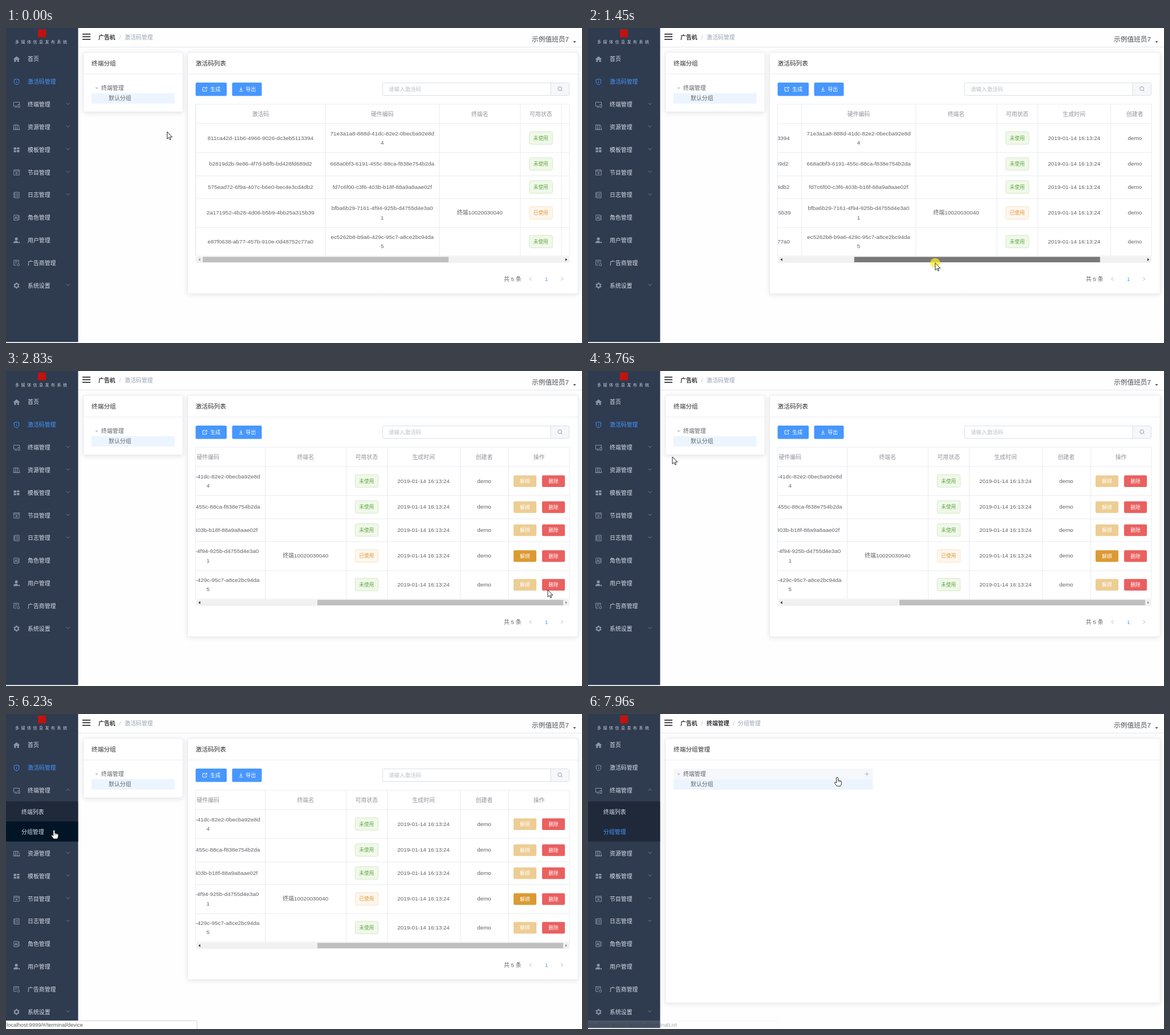
Recreate the animation shown at these times as an HTML page with a canvas. Size 1010 by 554 pixels, loop 8 s.

```html
<!DOCTYPE html>
<html lang="zh">
<head>
<meta charset="utf-8">
<title>激活码管理</title>
<style>
html, body { margin: 0; width: 100%; height: 100%; overflow: hidden; background: #fefefe; }
canvas { display: block; width: 1010px; height: 554px; }
</style>
</head>
<body>
<canvas id="stage" width="1010" height="554"></canvas>
<script>
const g = document.getElementById('stage').getContext('2d');
const LOOP = 8000;
const FONT = '"Liberation Sans", "Noto Sans CJK SC", "Noto Sans CJK", sans-serif';
const BLUE = '#4797ff', INK = '#303133', BODY = '#606266', LINE = '#e8ebf1';
const SIDE = '#2f3b4f', SUB = '#1f2939';
const SIDE_W = 126.5, SUB_Y = 153.5, SUB_H = 35.5;

const clamp = v => Math.max(0, Math.min(1, v));
const span = (t, a, b) => clamp((t - a) / (b - a));
const smooth = p => p * p * (3 - 2 * p);
const easeOut = p => 1 - Math.pow(1 - p, 2.4);
const within = (v, a, b) => v >= a && v < b;

// ---- drawing helpers ----
function rect(x, y, w, h, color) {
  g.fillStyle = color;
  g.fillRect(x, y, w, h);
}
function box(x, y, w, h, r, fill, edge) {
  g.beginPath();
  g.roundRect(x, y, w, h, r);
  g.fillStyle = fill;
  g.fill();
  if (edge) {
    g.strokeStyle = edge;
    g.lineWidth = 1;
    g.stroke();
  }
}
function text(s, x, y, color, { size = 9.9, align = 'left', weight = '' } = {}) {
  g.font = `${weight} ${size}px ${FONT}`;
  g.textAlign = align;
  g.textBaseline = 'alphabetic';
  g.fillStyle = color;
  g.fillText(s, x, y + size * 0.37);
}
function path(d, x, y, { fill, stroke, width = 1, turn = 0 }) {
  g.save();
  g.translate(x, y);
  g.rotate(turn);
  const p = new Path2D(d);
  if (fill) { g.fillStyle = fill; g.fill(p); }
  if (stroke) { g.strokeStyle = stroke; g.lineWidth = width; g.stroke(p); }
  g.restore();
}
function faded(alpha, dx, draw) {
  if (alpha <= 0) return;
  g.save();
  g.globalAlpha *= alpha;
  g.translate(dx, 0);
  draw();
  g.restore();
}

// ---- pointer ----
const track = [
  [0, 282.6, 182.6], [70, 282.6, 182.6], [530, 949, 440], [680, 949, 440],
  [1000, 487, 407], [1220, 487, 407], [1640, 699, 418], [1830, 701, 419],
  [2060, 701, 419], [2500, 890, 318], [2830, 950, 385], [2920, 950, 385],
  [3300, 760, 408], [3460, 760, 408], [3580, 500, 405], [3760, 148, 151],
  [4080, 97, 137], [4480, 97, 137], [4800, 97, 182], [5970, 97, 182],
  [6230, 84.3, 204], [7680, 84.3, 204], [7950, 437, 111], [8000, 437, 111]
];
function pointer(t) {
  const i = track.findIndex(k => k[0] > t);
  const a = track[i - 1], b = track[i];
  const p = smooth(span(t, a[0], b[0]));
  return { x: a[1] + (b[1] - a[1]) * p, y: a[2] + (b[2] - a[2]) * p };
}
const presses = [[1080, 1830], [4300, 4450], [6690, 6860]];
const ARROW = 'M0 0V12.4L2.8 9.8L4.8 14L6.6 13.2L4.8 9.1H8.8Z';
const HAND = 'M-1.5 1.2Q0-1 1.5 1.2V5.5L5.8 6.6Q7.8 7.2 7.6 9.5L7 13L5.6 15.8H-.6L-4.6 10.6Q-4.6 8.6-3 8.9L-1.5 10.2Z';

function drawPointer(t, c) {
  if (presses.some(([a, b]) => within(t, a, b))) {
    faded(0.72, 0, () => {
      g.beginPath();
      g.arc(c.x, c.y, 8.6, 0, 7);
      g.fillStyle = '#fff01e';
      g.fill();
    });
  }
  const onTree = t > 7600 && c.x < 500 && c.x > 150 && c.y < 133;
  const hand = c.x < 127 || onTree;
  path(hand ? HAND : ARROW, c.x, c.y, { fill: '#fff', stroke: '#111', width: 0.9 });
  if (hand) path('M1.5 5.5V9M3.6 6V9M5.7 6.6V9', c.x, c.y, { stroke: '#333', width: 0.6 });
}

// ---- sidebar ----
const menu = [
  ['首页', 'M-6 0L0-5L6 0H4.2V5H1.2V1.4H-1.2V5H-4.2V0Z', 1],
  ['激活码管理', 'M0-5L4.3-3.6V0Q4.3 3.8 0 5.2Q-4.3 3.8-4.3 0V-3.6ZM0-2.2V-1M0 0V2.4'],
  ['终端管理', 'M1 3H-5V-4H5V-1M-3 5H1M2.5 0H5.5V5H2.5Z', 0, 1],
  ['资源管理', 'M-5-4H-2V4H-5ZM-2-4H1V4H-2ZM1-3.4L3.2-4L5.2 4H1.5M-6 4.5H6', 0, 1],
  ['模板管理', 'M-5-4H-.6V0H-5ZM.6-4H5V-1H.6ZM-5 1.2H-.6V4.4H-5ZM.6 .2H5V4.4H.6Z', 1, 1],
  ['节目管理', 'M-4.8-4.5H4.8V4.8H-4.8ZM-4.8-2.2H4.8M-1 0L1.8 1.4L-1 2.8Z', 0, 1],
  ['日志管理', 'M-3-4.8H4.6V5H-3ZM-4.8-5V5M-1-2.3H3M-1 0H3M-1 2.4H3', 0, 1],
  ['角色管理', 'M-4.6-4.6H2.6V4.6H-4.6ZM4.6-4.5V4.5M-3 2.8L-1-2.6L1 2.8M-2.4 1H.4'],
  ['用户管理', 'M-3-2.6A2.6 2.6 0 1 1 2.2-2.6A2.6 2.6 0 1 1-3-2.6M-5.6 5Q-5 .6-.4 .8Q2 .8 2.4 2V5ZM3.2 2.6H5.6V5H3.2Z', 1],
  ['广告商管理', 'M-.5 3.8H-4.8V-4.8H3.6V-.4M-3-2.4H2M-3 0H0M1.2 3A2 2 0 1 1 5.2 3A2 2 0 1 1 1.2 3'],
  ['系统设置', 'M3.2 0A3.2 3.2 0 1 1-3.2 0A3.2 3.2 0 1 1 3.2 0M0-5.4V-3M0 3V5.4M4.7-2.7L2.6-1.5M-4.7 2.7L-2.6 1.5M4.7 2.7L2.6 1.5M-4.7-2.7L-2.6-1.5', 0, 1]
];

function drawSidebar(t, c) {
  const open = easeOut(span(t, 4300, 4620));
  const moved = t >= 6860;
  rect(0, 0, SIDE_W, 552.3, SIDE);
  rect(56, 2.5, 14, 14, '#c0130f');
  g.letterSpacing = '3.5px';
  text('多媒体信息发布系统', 16, 24, '#c9cfd8', { size: 7 });
  g.letterSpacing = '0px';

  menu.forEach(([label, icon, solid, arrow], i) => {
    const y = 54.8 + i * 39.82 + (i > 2 ? open * 2 * SUB_H : 0);
    const over = c.x < SIDE_W && Math.abs(c.y - y) < 19.9;
    if (over && (i < 3 || open === 0)) rect(0, y - 19.9, SIDE_W, 39.8, '#283446');
    const active = i === 1 && !moved;
    const tone = active ? BLUE : '#8b95a4';
    const thick = i === 10 ? 2 : 1;
    path(icon, 18.5, y, solid ? { fill: tone } : { stroke: tone, width: thick });
    text(label, 38, y, active ? BLUE : '#d8dfe9');
    if (arrow) path('M-3-1.5L0 1.5L3-1.5', 108.5, y - 1.2, { stroke: '#7d8898', width: 0.9, turn: i === 2 ? open * Math.PI : 0 });
  });

  if (!open) return;
  g.save();
  g.beginPath();
  g.rect(0, SUB_Y, SIDE_W, 2 * SUB_H * open);
  g.clip();
  rect(0, SUB_Y, SIDE_W, 2 * SUB_H, SUB);
  ['终端列表', '分组管理'].forEach((label, i) => {
    const top = SUB_Y + i * SUB_H;
    const over = t > 4620 && c.x < SIDE_W && within(c.y, top, top + SUB_H);
    if (over) rect(0, top, SIDE_W, SUB_H, i ? '#021526' : '#111d2b');
    text(label, 27, top + 18.7, i && moved ? BLUE : '#d8dfe9');
  });
  g.restore();
}

// ---- header ----
function drawHeader(t) {
  rect(SIDE_W, 33, 884, 1, '#e4e6ea');
  for (let i = 0; i < 3; i++) rect(134, 10 + i * 4.6, 14, 1.5, '#111');
  text('广告机', 162, 16.5, INK, { weight: 'bold' });
  text('/', 198.5, 16.5, '#b4bac5');
  const p = easeOut(span(t, 6860, 7360));
  faded(1 - p, p * 20, () => text('激活码管理', 208, 16.5, '#97a3b4'));
  faded(p, (1 - p) * 20, () => {
    text('终端管理', 208, 16.5, INK, { weight: 'bold' });
    text('/', 254, 16.5, '#b4bac5');
    text('分组管理', 263, 16.5, '#97a3b4');
  });
  text('示例值班员7', 922, 20, '#4a4d52', { size: 11.7 });
  path('M-2.7-1.3H2.7L0 1.6Z', 997, 24.5, { fill: '#444' });
  if (t >= 6860) drawProgress(t);
}

function drawProgress(t) {
  faded(1 - span(t, 6960, 7100), 0, () => {
    rect(0, 0, 1010 * easeOut(span(t, 6840, 7000)), 1.5, '#2299dd');
  });
  faded(1 - span(t, 7000, 7180), 0, () => {
    const a = (t - 7090) / 64;
    g.beginPath();
    g.arc(995, 18, 6, a, a + 2.9);
    g.strokeStyle = '#2299dd';
    g.lineWidth = 1.5;
    g.stroke();
  });
}

// ---- pages ----
function card(x, y, w, h, title) {
  g.save();
  g.shadowColor = 'rgba(0,0,0,.11)';
  g.shadowBlur = 8;
  g.shadowOffsetY = 1.5;
  box(x, y, w, h, 2.5, '#fff');
  g.restore();
  box(x + 0.5, y + 0.5, w - 1, h - 1, 2.5, '#fff', LINE);
  rect(x, y + 38, w, 1, LINE);
  text(title, x + 14.5, y + 19.7, INK, { size: 10.7 });
}
function tree(width, hover) {
  if (hover) {
    rect(150, 96, width, 18.5, '#f5f7fa');
    path('M-3.5 0H3.5M0-3.5V3.5', 489, 105.5, { stroke: '#93aede', width: 0.9 });
  }
  rect(150, 114.5, width, 18.5, '#ecf5ff');
  path('M-2.8-1.5H2.8L0 1.7Z', 159, 106, { fill: '#c0c4cc' });
  text('终端管理', 167, 105.3, BODY);
  text('默认分组', 180, 123.8, BODY);
}

const cols = [332.5, 560, 759.5, 902, 973.5, 1101.5, 1186.5, 1293.5];
const heads = ['激活码', '硬件编码', '终端名', '可用状态', '生成时间', '创建者', '操作'];
const rows = [
  [168, 219, '811ca42d-11b6-4966-9026-dc3eb5113394', '71e3a1a8-888d-41dc-82e2-0becba92e8d', '4'],
  [219, 259.5, 'b2819d2b-9e86-4f7d-b8fb-bd428fd689d2', '668a0bf3-6191-455c-88ca-f838e754b2da'],
  [259.5, 300, '575ead72-6f9a-407c-b6e0-bec4e3cd4db2', 'fd7c6f00-c3f6-403b-b18f-88a9a8aae02f'],
  [300, 350.5, '2a171952-4b28-4d06-b5b9-4bb25a315b39', 'bfba6b29-7161-4f94-925b-d4755d4e3a0', '1'],
  [350.5, 401, 'e87f0638-ab77-457b-910e-0d48752c77a0', 'ec5262b8-b9a6-429c-95c7-a8ce2bc94da', '5']
];
const mid = i => (cols[i] + cols[i + 1]) / 2;
const center = { align: 'center' };
const small = { align: 'center', size: 8.7 };

function drawRow([top, bottom, code, hard, tail], i) {
  const y = (top + bottom) / 2 - 0.6;
  const used = i === 3;
  const cell = (s, col, dy = 0) => text(s, mid(col), y + dy, BODY, center);
  rect(332, Math.round(bottom) - 0.5, 970, 1, LINE);
  cell(code, 0);
  cell(hard, 1, tail ? -8 : 0);
  if (tail) cell(tail, 1, 8.5);
  if (used) cell('终端10020030040', 2);
  const x = mid(3);
  box(x - 20, y - 10.5, 40.5, 22, 3, used ? '#fdf6ec' : '#f0f8ea', used ? '#f8e3c4' : '#d3eac5');
  text(used ? '已使用' : '未使用', x, y + 0.4, used ? '#e0993a' : '#62a83f', small);
  cell('2019-01-14 16:13:24', 4);
  cell('demo', 5);
  const b = cols[6] + 9;
  box(b, y - 9.3, 40, 20.3, 2.2, used ? '#dc9a33' : '#edcd93');
  box(b + 50, y - 9.3, 40, 20.3, 2.2, '#e9605f');
  text('解绑', b + 20, y + 0.9, '#fff', small);
  text('删除', b + 70, y + 0.9, '#fff', small);
}

function drawTable(t, c, part) {
  g.save();
  g.beginPath();
  g.rect(332, 133, 656, 268);
  g.clip();
  g.translate(-305.5 * part, 0);
  rect(332, 133.5, 970, 1, LINE);
  rect(332, 167.5, 970, 1, LINE);
  cols.forEach(x => rect(Math.round(x) - 0.5, 134, 1, 267, LINE));
  heads.forEach((s, i) => text(s, mid(i), 151, '#909399', center));
  rows.forEach(drawRow);
  g.restore();
  rect(332, 134, 1, 267, LINE);
  rect(987.5, 134, 1, 267, LINE);

  const thumb = 345 + 201 * part;
  const over = within(c.y, 402, 413) && within(c.x, thumb, thumb + 431);
  const held = within(t, ...presses[0]);
  rect(333, 401.5, 655, 11.5, '#f1f1f1');
  rect(thumb, 402.5, 431, 9.5, held ? '#787878' : over ? '#a8a8a8' : '#bfbfbf');
  path('M1.6-2.6V2.6L-1.6 0Z', 339, 407.3, { fill: part > 0 ? '#333' : '#999' });
  path('M-1.6-2.6V2.6L1.6 0Z', 982.5, 407.3, { fill: part < 1 ? '#333' : '#999' });
}

function drawList(t, c) {
  const part = t < presses[0][0] ? 0 : t < presses[0][1] ? clamp((c.x - 487) / 201) : 1;
  card(135.5, 42.5, 175, 105.5, '终端分组');
  tree(145.5, false);
  card(318, 42.5, 685.5, 425, '激活码列表');

  box(332.5, 96, 54.5, 23.5, 2.2, BLUE);
  path('M.5-3H-3.5V3.5H3V.5M0 .5L3.5-3M1.2-3.4H3.7V-1', 348.5, 107.6, { stroke: '#fff', width: 0.9 });
  text('生成', 358.3, 108, '#fff', { size: 8.9 });
  box(396.5, 96, 52, 23.5, 2.2, BLUE);
  path('M0-3.5V1.5M-2-.6L0 1.5L2-.6M-3.2 3.4H3.2', 412, 107.6, { stroke: '#fff', width: 0.9 });
  text('导出', 420.3, 108, '#fff', { size: 8.9 });

  box(660.5, 96.5, 327, 22, 2.5, '#fff', '#dcdfe6');
  box(955, 97, 32, 21, [0, 2, 2, 0], '#f5f7fa');
  rect(954.5, 97, 1, 21, '#dcdfe6');
  text('请输入激活码', 671, 107.6, '#b9bec8', { size: 9.5 });
  path('M3-.6A3.4 3.4 0 1 1-3.8-.6A3.4 3.4 0 1 1 3-.6M2 2L4 4', 971.5, 107.3, { stroke: '#909399', width: 0.9 });

  drawTable(t, c, part);

  text('共 5 条', 873, 441, BODY);
  path('M1.5-3L-1.5 0L1.5 3', 919.5, 441.3, { stroke: '#a4a9b3' });
  text('1', 947.8, 441, BLUE, center);
  path('M-1.5-3L1.5 0L-1.5 3', 975, 441.3, { stroke: '#a4a9b3' });
}

function drawGroups(t, c) {
  card(135.5, 42.5, 868, 466, '终端分组管理');
  tree(349.5, within(c.x, 150, 500) && c.y < 114.5);
}

// ---- link hint at the bottom ----
function drawHint(t) {
  const shown = span(t, 5130, 5220), gone = span(t, 7800, 7950);
  const page = within(t, 6080, 7720) ? 'device' : 'terminalList';
  faded(shown * (1 - 0.88 * gone), 0, () => box(-1.5, 539.5, 336.5, 18, [0, 2, 0, 0], '#fff', '#cfd1d4'));
  // the label darkens over the sidebar and vanishes over the page
  g.save();
  g.beginPath();
  g.rect(0, 540, gone < 1 ? 335 : 160, 14);
  g.clip();
  faded(shown * (1 - 0.6 * gone), 0, () => {
    text('localhost:9999/#/terminal/' + page, 1, 547, gone ? '#2a2e34' : '#5a5d61', { size: 9.4 });
  });
  g.restore();
}

function draw(t) {
  const c = pointer(t);
  rect(0, 0, 1010, 554, '#fefefe');
  const out = span(t, 6860, 7090), into = easeOut(span(t, 7110, 7610));
  faded(1 - easeOut(out), out * 20, () => drawList(t, c));
  faded(into, (into - 1) * 21, () => drawGroups(t, c));
  drawHeader(t);
  drawSidebar(t, c);
  drawHint(t);
  drawPointer(t, c);
}

const start = performance.now();
function tick() {
  draw((performance.now() - start) % LOOP);
  requestAnimationFrame(tick);
}
tick();
</script>
</body>
</html>
```
